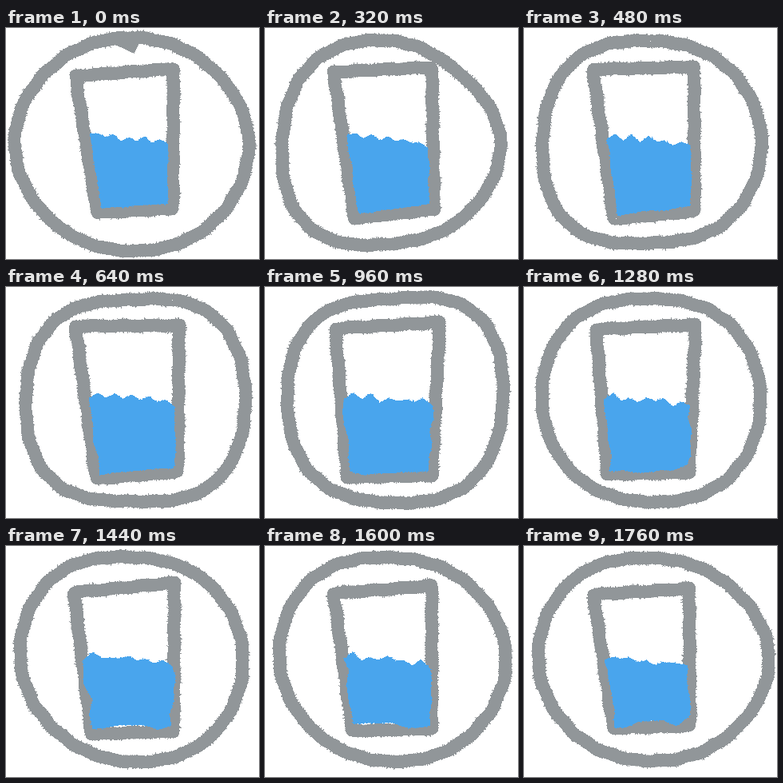
Recreate the animation shown at these times as an HTML page. Size 317 by 289 pixels, loop 1.92 s.

```html
<!DOCTYPE html>
<html lang="en">
<head>
<meta charset="utf-8">
<title>Glass of water</title>
<style>
html, body { margin: 0; width: 100%; height: 100%; overflow: hidden; background: #fff; }
svg { display: block; width: 100%; height: 100%; }
</style>
</head>
<body>
<svg viewBox="0 0 317 289" shape-rendering="crispEdges" stroke-linejoin="round">
  <g fill="#919699" stroke="#919699" stroke-width="15.5">
    <path id="ring" fill="none"/>
    <path id="cup" fill="none"/>
    <path id="fuzz" stroke="none"/>
  </g>
  <path id="water" fill="#49a5ed"/>
</svg>
<script>
const STEP = 160, CX = 158, CY = 141, HALF = 7.6;

// ring: radii every 45 degrees clockwise from the right; cup: corners from top left
const poses = [
  { ring: [146, 144, 138, 142, 147, 136, 129, 134], cup: [87, 60, 210, 51, 209, 226, 114, 231], tail: "M136 12L164 25" },
  { ring: [137, 132, 129, 149, 136, 138, 125, 120], cup: [86, 55, 209, 49, 212, 227, 112, 238] },
  { ring: [142, 146, 127, 142, 133, 138, 125, 146], cup: [87, 49, 217, 48, 215, 231, 113, 240] },
  { ring: [140, 143, 129, 136, 130, 138, 126, 151], cup: [88, 52, 219, 44, 209, 236, 103, 238] },
  { ring: [138, 139, 127, 135, 131, 134, 126, 140], cup: [96, 48, 219, 48, 204, 232, 102, 234] },
  { ring: [139, 138, 129, 131, 140, 142, 127, 134], cup: [85, 58, 211, 46, 210, 232, 107, 235] },
  { ring: [149, 137, 128, 133, 140, 138, 126, 134], cup: [87, 61, 207, 53, 208, 225, 112, 228] }
];
// Drawing shown in each step; halves are in-between redraws.
const order = [0, .5, 1, 1.5, 2, 2.5, 3, 4, 4.5, 5, 5.5, 6];

const mix = (a, b, k) => a + (b - a) * k;
const mixAll = (a, b, k) => a.map((v, i) => mix(v, b[i], k));
const line = pts => "M" + pts.map(p => p[0].toFixed(1) + " " + p[1].toFixed(1)).join("L") + "Z";

function random(seed) {
  let s = seed * 7919 + 17;
  return () => (s = s * 16807 % 2147483647) / 2147483647;
}

// Points about every 2.4 px along a closed polygon, corners included
function trace(corners) {
  return corners.flatMap((a, i) => {
    const b = corners[(i + 1) % corners.length];
    const n = Math.max(1, Math.round(Math.hypot(b[0] - a[0], b[1] - a[1]) / 2.4));
    return Array.from({ length: n }, (_, j) => mixAll(a, b, j / n));
  });
}

// Round loop whose radius runs smoothly through the given values
function circle(radii) {
  const n = radii.length, count = 360;
  return Array.from({ length: count }, (_, j) => {
    const pos = j / count * n, i = Math.floor(pos), t = pos - i;
    const [a, b, c, d] = [-1, 0, 1, 2].map(k => radii[(i + k + n) % n]);
    const r = b + .5 * t * (c - a + t * (2 * a - 5 * b + 4 * c - d + t * (3 * (b - c) + d - a)));
    const angle = j / count * 2 * Math.PI;
    return [CX + r * Math.cos(angle), CY + r * Math.sin(angle)];
  });
}

// Small random teeth along one side of a loop
function teeth(pts, half, height, rnd) {
  const sign = Math.sign(half);
  return pts.map((a, i) => {
    const b = pts[(i + 1) % pts.length], len = Math.hypot(b[0] - a[0], b[1] - a[1]) || 1;
    const nx = (b[1] - a[1]) / len, ny = (a[0] - b[0]) / len;
    const at = (p, r) => [p[0] + nx * r, p[1] + ny * r];
    const mid = mixAll(a, b, rnd() * 1.6 - .3);
    const tip = half + sign * height * (.15 + rnd() ** 2.2), base = half - sign * 1.5;
    return line([at(a, base), at(a, half), at(mid, tip), at(b, half), at(b, base)]);
  }).join("");
}

// Water fills the lower cup; its outline gets looser with each drawing
function fill(c, pos, rnd) {
  const inset = 7 - .8 * pos, loose = 1 + .8 * pos, level = 133 + .8 * pos;
  const jitter = size => (rnd() - .5) * 2 * size;
  const side = (x0, y0, x1, y1, y) => mix(x0, x1, (y - y0) / (y1 - y0));
  const left = y => side(c[0], c[1], c[6], c[7], y) + inset;
  const right = y => side(c[2], c[3], c[4], c[5], y) - inset;
  const x0 = left(level), x1 = right(level), floor = [c[7] - 6, c[5] - 6];
  const pts = [];
  for (let i = 0; i <= 10; i++)
    pts.push([mix(x0, x1, i / 10), level + i * 1.1 + (i % 2 ? -2.5 : 2.5) + jitter(3)]);
  for (let i = 1; i < 5; i++) {
    const y = mix(level + 11, floor[1], i / 5);
    pts.push([right(y) + jitter(loose), y]);
  }
  for (let i = 0; i <= 6; i++) {
    const y = mix(floor[1], floor[0], i / 6);
    pts.push([mix(right(y), left(y), i / 6), y + jitter(loose)]);
  }
  for (let i = 4; i > 0; i--) {
    const y = mix(level, floor[0], i / 5);
    pts.push([left(y) + jitter(loose), y]);
  }
  return trace(pts);
}

const frames = order.map((pos, seed) => {
  const i = Math.floor(pos), k = pos - i, a = poses[i], b = poses[Math.ceil(pos)];
  const rnd = random(seed + 1);
  const wobble = pts => {
    const u = rnd() * 6, v = rnd() * 6;
    return pts.map(([x, y], j) => [x + .7 * Math.sin(j * .37 + u), y + .7 * Math.sin(j * .43 + v)]);
  };
  const c = mixAll(a.cup, b.cup, k);
  const ring = wobble(circle(mixAll(a.ring, b.ring, k)));
  const cup = wobble(trace([0, 2, 4, 6].map(j => [c[j], c[j + 1]])));
  const water = fill(c, pos, rnd);
  const sides = pts => teeth(pts, HALF, 2.5, rnd) + teeth(pts, -HALF, 2.5, rnd);
  return {
    ring: line(ring) + (!k && a.tail || ""),
    cup: line(cup),
    fuzz: sides(ring) + sides(cup),
    water: line(water) + teeth(water, .2, 2, rnd)
  };
});

let shown = -1;
function draw(time) {
  const n = Math.floor(time / STEP) % frames.length;
  if (n === shown) return;
  shown = n;
  for (const id in frames[n]) document.getElementById(id).setAttribute("d", frames[n][id]);
}
const start = performance.now();
function tick() {
  draw(performance.now() - start);
  requestAnimationFrame(tick);
}
tick();
</script>
</body>
</html>
```
